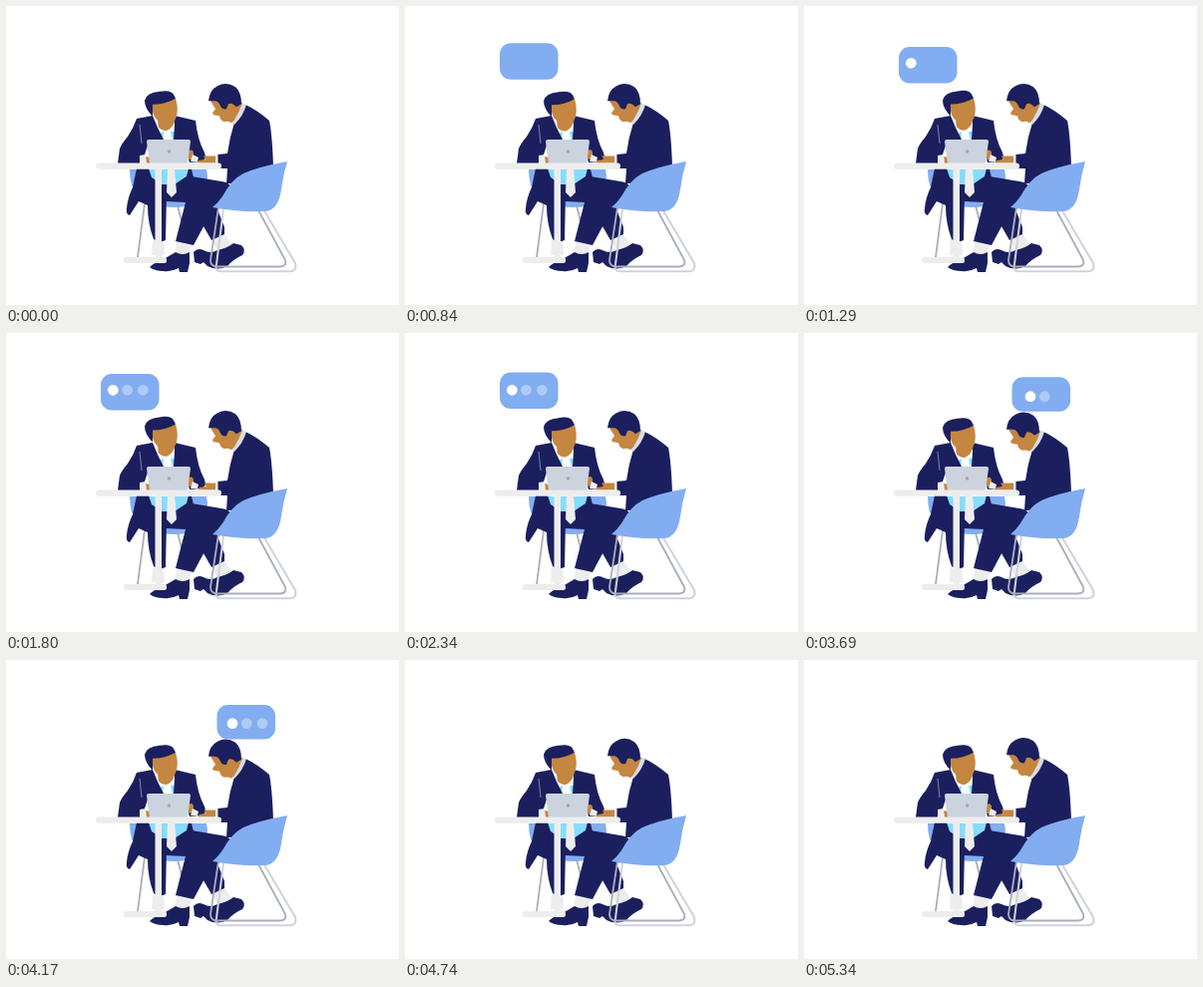
Recreate the animation shown at these times as an HTML page. Size 394x300 px, loop 5370 ms.

```html
<!DOCTYPE html>
<html lang="en">
<head>
<meta charset="utf-8">
<title>Meeting</title>
<style>
html, body { margin: 0; width: 100%; height: 100%; overflow: hidden; background: #fff }
svg { display: block; width: 394px; height: 300px }
.navy { fill: #1b1f5e }
.skin { fill: #c58642 }
.blue { fill: #82adf1 }
.pale { fill: #ededed }
.cyan { fill: #86dcfc }
.leg { fill: none; stroke: #a9aebb; stroke-width: 1.8; stroke-linejoin: round }
.far { stroke: #cfd3dc; stroke-width: 2 }
</style>
</head>
<body>
<svg viewBox="0 0 394 300">
  <!-- rear chair -->
  <path class="leg" d="M139 198L132 252M172 200L182 240"/>
  <path class="blue" d="M124 164H201Q204 176 198 190L181 201Q168 203 158 201L126 180Q124 172 124 164Z"/>

  <!-- left man: legs -->
  <path class="pale" d="M147 234L158 232 159 250 146 250ZM172 234L187 238 183 249 169 248ZM205 233L219 229 227 240 213 247Z"/>
  <path class="navy" d="M144 262Q149 257 158 254L170 247Q177 251 184 247L184 258 182 267 174 267 173 263Q166 267 158 266Q149 266 144 262Z"/>
  <path class="navy" d="M188 247Q192 242 198 245Q205 249 212 245Q222 243 228 238L236 240Q241 245 237 250Q228 254 222 261Q212 266 202 261L198 257 195 259 189 257Z"/>
  <path class="navy" d="M142 180L161 188 160 235Q153 238 148 234Q142 218 142 200Z"/>
  <path class="navy" d="M194 214L212 204 219 222 219 229 206 235Z"/>
  <path class="navy" d="M148 178L170 180 186 171 216 176Q224 177 226 182L212 206 203 212 188 240 170 236 180 197 160 196Z"/>

  <!-- left man: torso -->
  <path class="cyan" d="M152 119L169 115 169 136H152ZM143 164H184L181 171 169 179H155L145 175Z"/>
  <path fill="#fff" d="M150 118L160 124 169 116 171 126 165 126 167 135H157L158 126 152 129Z"/>
  <path class="navy" d="M147 110L131 113Q128 122 122 131 116 138 114 143L112 158H136L142 140 158 134 152 122ZM169 110L190 115Q192 134 199 147Q202 155 195 156L184 157 178 135 168 134 169 119Z"/>
  <path fill="none" stroke="#c9ccd8" stroke-width=".6" d="M134 119L136 138"/>
  <path class="navy" d="M131 163H143L146 172 155 178 150 190 142 200 133 196 124 210Q120 209 121 203Q122 192 127 182Z"/>
  <path class="navy" d="M183 163L186 164 188 172 172 183 169 179 181 171Z"/>
  <path class="pale" d="M162 163L169 163 171 187 166 192 161 187Z"/>
  <g id="headA">
    <path class="skin" d="M146 96L170 92Q173 101 171 110Q169 114 168 118Q161 129 153 121L152 114Q146 109 146 96Z"/>
    <path class="navy" d="M147 110Q139 102 139 94Q141 86 154 85Q165 83 168 88L170 92Q160 98 147 98Z"/>
  </g>

  <!-- right man -->
  <path class="navy" d="M240 99Q251 104 264 115Q267 130 268 162L239 178H221L222 163H212V149L222 148Q224 132 229 117Z"/>
  <path fill="#d9dce1" d="M235 97L241 99Q238 110 229 119L226 116Z"/>
  <g id="headB">
    <path class="skin" d="M205 95L222 92 237 97Q234 106 229 114L226 117Q222 115 219 116Q215 115 214 110L208 109 207 107 210 103Z"/>
    <path class="navy" d="M203 95Q204 84 212 80Q221 75 230 81Q236 86 236 98L231 101Q227 96 223 98L221 103Q217 104 215 100Q213 95 209 95Z"/>
  </g>

  <!-- table and laptop -->
  <path class="pale" d="M149.500 162H156V253H149.500Z"/>
  <rect class="pale" x="118" y="252" width="43" height="6" rx="2.500"/>
  <path class="skin" d="M140 151L145 152 145 158H139Z"/>
  <path class="pale" d="M134 150L140 149 141 158H134Z"/>
  <path class="skin" id="handA" d="M183 145Q188 143 188 148L187 154H183Z"/>
  <path class="pale" d="M187 149L193 152 192 156 185 156Z"/>
  <path class="skin" id="handB" d="M198 150.500H211V157.500L192 157.500 193 155 200 154Z"/>
  <path class="pale" d="M210 149H212.500V158H210Z"/>
  <path fill="#cbd3de" d="M143 134H183Q185 134 185 136L182 158H144L141 136Q141 134 143 134Z"/>
  <circle cx="163.500" cy="146" r="1.700" fill="#9da6b5"/>
  <rect class="pale" x="90" y="157.500" width="126" height="6.300" rx="3"/>

  <!-- front chair -->
  <path class="leg far" d="M257.500 203L290 258Q292 266 285 266.300H215Q209 266 211 259L218 204"/>
  <path class="leg" d="M213 202L205 255Q205 261 211 261.500H275Q282 261 280 255L252 203"/>
  <path class="blue" d="M282 156Q278 169 276 184Q273 205 260 206Q231 207 207 202Q213 197 217 191Q226 174 238 168Q254 161 282 156Z"/>

  <g id="talkA"></g>
  <g id="talkB"></g>
</svg>
<script>
const LOOP = 5370;
const $ = id => document.getElementById(id);
const clamp = v => Math.max(0, Math.min(1, v));

// eased value through [time, value] pairs
function track(t, keys) {
  let [t0, v0] = keys[0];
  for (const [t1, v1] of keys) {
    if (t < t1) {
      const u = clamp((t - t0) / (t1 - t0));
      return v0 + (v1 - v0) * u * u * (3 - 2 * u);
    }
    [t0, v0] = [t1, v1];
  }
  return v0;
}

const talks = [
  { id: 'talkA', from: 640, to: 2400, h: 36.5, dotX: 107.3, dotY: 57.3, dots: [1100, 1320, 1540],
    x: [[0, 95]], y: [[640, 35], [1110, 40.5], [1500, 41.5], [1800, 41], [2160, 39.5], [2400, 39.5]] },
  { id: 'talkB', from: 3030, to: 4260, h: 34.5, dotX: 227, dotY: 63.7, dots: [3330, 3550, 3770],
    x: [[3030, 208], [3690, 208.5], [4170, 211.5]], y: [[3030, 42], [3690, 44.3], [4170, 45]] }
];

for (const k of talks) {
  $(k.id).innerHTML = `<rect class="blue" width="58.500" height="${k.h}" rx="11"/>` +
    [0, 14.3, 30].map(d => `<circle cx="${k.dotX + d}" cy="${k.dotY}" r="5.400" fill="#fff"/>`).join('');
}

function draw(t) {
  for (const k of talks) {
    const g = $(k.id), [box, ...dots] = g.children;
    g.setAttribute('visibility', t >= k.from && t < k.to ? 'visible' : 'hidden');
    g.setAttribute('opacity', clamp((t - k.from) / 90));
    box.setAttribute('x', track(t, k.x));
    box.setAttribute('y', track(t, k.y));
    dots.forEach((dot, i) => dot.setAttribute('opacity', clamp((t - k.dots[i]) / 120) * (i ? 0.36 : 1)));
  }
  const move = (id, x, y) => $(id).setAttribute('transform', `translate(${x} ${y})`);
  move('headA', 0, track(t, [[0, 0.8], [840, 1.2], [1800, -0.6], [2910, 1], [3690, 0.7], [LOOP, 0.8]]));
  move('headB', 0, track(t, [[0, 0.2], [2600, 0.2], [3690, 1.8], [4250, 1.8], [LOOP, 0.2]]));
  move('handA', 0, 0.5 * Math.sin(t / LOOP * Math.PI * 12));
  move('handB', Math.sin(t / LOOP * Math.PI * 8), 0);
}

function tick(now) {
  draw(now % LOOP);
  requestAnimationFrame(tick);
}
draw(0);
requestAnimationFrame(tick);
</script>
</body>
</html>
```
